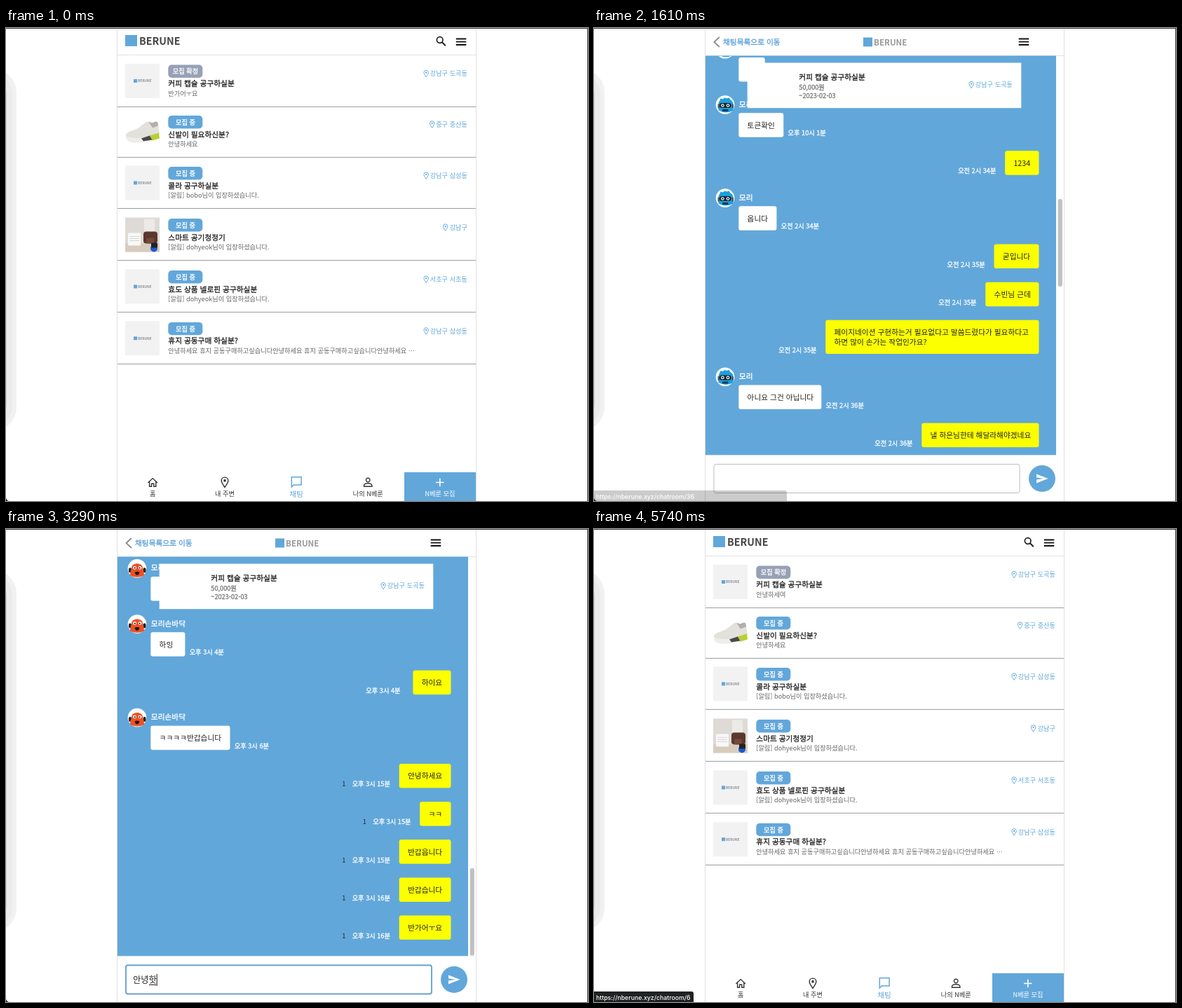
These frames come from a looping animation (830x675 px, 6020 ms). An HTML page:

```html
<!DOCTYPE html>
<html lang="ko">
<head>
<meta charset="utf-8">
<title>Chat room</title>
<style>
  html, body { margin: 0; width: 100%; height: 100%; overflow: hidden; background: #fff; }
  svg { display: block; width: 830px; height: 675px; }
  text { font-family: "Noto Sans CJK KR", "Noto Sans KR", "Noto Sans CJK", sans-serif; }
  /* medium weight: regular with a hairline outline */
  .m { stroke-width: .3px; }
  .b { font-weight: 700; }
  .end { text-anchor: end; }
  .mid { text-anchor: middle; }
  .tip text { font-family: Inter, "Noto Sans CJK KR", sans-serif; font-weight: 500; }
  .log { transform: translateY(calc(var(--s) * -1px)); }
  .bar1 { transform: translateY(calc(var(--s) * 569px / 2590)); }
  .bar2 { transform: translateY(calc(var(--s) * 569px / 2644)); }
</style>
</head>
<body>
<svg id="stage" viewBox="0 0 830 675"></svg>
<script>
const LOOP = 6020, STEP = 70;
const BLUE = '#62a7da', YELLOW = '#fbff00', BIG = 10.7, SMALL = 9.2;
let css = '', count = 0;

// Stepped keyframes from [ms, declarations] pairs
function anim(stops) {
  const id = 'k' + count++;
  const rows = stops.map(([ms, d]) => `${(Math.max(0, ms - 1) / LOOP * 100).toFixed(3)}%{${d}}`);
  css += `@keyframes ${id}{${rows.join('')}}`;
  return `style="animation:${id} ${LOOP}ms step-end infinite"`;
}
const fade = stops => anim(stops.map(([ms, o]) => [ms, `opacity:${o}`]));
const show = (from, to, body) => `<g ${fade([[0, 0], [from, 1], [to, 0]])}>${body}</g>`;

// y is the middle of the line
function txt(x, y, s, size, fill, cls = '') {
  const stroke = cls.split(' ').includes('m') ? `stroke="${fill}"` : '';
  return `<text x="${x}" y="${y + size * .38}" font-size="${size}" fill="${fill}" ${stroke} class="${cls}">${s}</text>`;
}
const box = (x, y, w, h, fill, r = 0) =>
  `<rect x="${x}" y="${y}" width="${w}" height="${h}" rx="${r}" fill="${fill}"/>`;
const line = (d, color, w = 1, fill = 'none') =>
  `<path d="${d}" fill="${fill}" stroke="${color}" stroke-width="${w}"/>`;
const dot = (x, y, r, fill) => `<circle cx="${x}" cy="${y}" r="${r}" fill="${fill}"/>`;

function em(c) {
  if (/[ㄱ-힣]/.test(c)) return .92;
  if (c === ' ') return .224;
  if (/\d/.test(c)) return .555;
  if (/[[\]]/.test(c)) return .338;
  return c === '.' ? .278 : .58;
}
const width = (s, size) => [...s].reduce((sum, c) => sum + em(c) * size, 0);

const pin = (x, y, k, color) => `<g transform="translate(${x} ${y}) scale(${k})">
  ${line('M0 5C-1.2 2.8-3.2.6-3.2-1.4A3.2 3.2 0 0 1 3.2-1.4C3.2.6 1.2 2.8 0 5Z', color, .95)}
  ${dot(0, -1.4, 1.2, color)}</g>`;
const place = (right, y, s) =>
  pin(right - width(s, SMALL) - 6, y, 1, BLUE) + txt(right, y, s, SMALL, BLUE, 'end');
const menu = x => line(`M${x} 15.5h14.5M${x} 19.7h14.5M${x} 24h14.5`, '#111', 1.8);

// ---- list page ----
const rooms = [
  ['커피 캡슐 공구하실분', '', '강남구 도곡동', 0],
  ['신발이 필요하신분?', '안녕하세요', '중구 중산동', 72.5],
  ['콜라 공구하실분', '[알림] bobo님이 입장하셨습니다.', '강남구 삼성동', 145.5],
  ['스마트 공기청정기', '[알림] dohyeok님이 입장하셨습니다.', '강남구', 219.5],
  ['효도 상품 넬로핀 공구하실분', '[알림] dohyeok님이 입장하셨습니다.', '서초구 서초동', 293.5],
  ['휴지 공동구매 하실분?',
    '안녕하세요 휴지 공동구매하고싶습니다안녕하세요 휴지 공동구매하고싶습니다안녕하세요 …', '강남구 삼성동', 367.3]
];

const blank = box(170, 51, 49, 49, '#f2f2f2') + box(182, 73, 5, 5, BLUE) +
  txt(188, 75.6, 'BERUNE', 4.8, '#8a8f96', 'b');
const shoe = `<path d="M171 80q1-4 9-6 9-3 14-8l7-5 7 2 6-2q3 0 3 5l2 13q-8 8-38 9-11 0-10-8z" fill="#e3e1dc"/>
  <path d="M171 82q10 4 24 2l23-5v7q-20 6-38 5-10-2-9-9z" fill="#eeedea"/>
  <path d="M203 61l5 2 6-2q3 0 3 6l-8 3z" fill="#b3b0ab"/>
  <path d="M193 85l12-4 4 6-13 2z" fill="#4a4a4a"/><path d="M205 81l13-4 1 8-10 3z" fill="#b9cf32"/>`;
const photo = box(170, 51, 49, 49, '#dedad6') + box(170, 88, 49, 12, '#d8ccbe') +
  box(197, 53, 15, 18, '#eceae7') + box(174, 73, 18, 18, '#f8f8f8', 1) +
  line('M176 78h14M176 81h14M176 84h14', '#cfcfcf', .8) + box(196, 71, 20, 17, '#5b382e', 4) +
  box(200, 80, 11, 8, '#75483a', 2) + dot(211, 95, 5, '#1c59cf') + box(207, 87, 9, 7, '#222', 1);

function room([title, last, where, dy], i) {
  const pic = i === 1 ? shoe : i === 3 ? photo : blank;
  return `<g transform="translate(0 ${dy})">${pic}
    ${box(231.3, 52.6, 49, 18.4, i ? BLUE : '#96a1b6', 5)}
    ${txt(256, 62, i ? '모집 중' : '모집 확정', SMALL, '#fff', 'm mid')}
    ${txt(231.3, 79, title, BIG, '#222', 'm')}${txt(231.3, 93.3, last, SMALL, '#666')}
    ${place(658, 65, where)}</g>` + line(`M158 ${Math.round(111.7 + dy)}.5h512`, '#98a0a4');
}

const tab = (x, s, color = '#333', size = SMALL) => txt(x, 664.5, s, size, color, 'mid');
const nav = box(568, 634, 102.5, 41, BLUE) +
  line('M202.5 649l6.7-6.4 6.7 6.4M204.6 647.5v6.7h3v-4h3.2v4h3v-6.7', '#333', 1.4) + tab(209.3, '홈') +
  pin(312, 648, 1.5, '#333') + tab(312, '내 주변') +
  line('M407.3 655v-14.3h13.8v11.3h-11z', BLUE, 1.5) + tab(414, '채팅', BLUE, BIG) +
  line('M510.5 654.2v-1.5c0-2 3.5-3 5.7-3s5.7 1 5.7 3v1.5zM519 645a2.8 2.8 0 1 0-5.6 0 2.8 2.8 0 1 0 5.6 0z', '#333', 1.4) +
  tab(516.3, '나의 N베룬') +
  line('M613 648.5h11.5M618.8 642.8v11.5', '#fff', 1.6) + tab(619, 'N베룬 모집', '#fff');

const list = box(170, 10, 17, 16, BLUE) + txt(190, 18.3, 'BERUNE', 14.3, '#444', 'b') +
  `<circle cx="618.7" cy="17" r="4.3" fill="none" stroke="#222" stroke-width="1.7"/>` +
  line('M621.8 20.2l5 5', '#222', 2) + menu(641.8) + line('M158 38.5h512', '#e3e3e3') +
  rooms.map(room).join('') +
  show(0, 1120, txt(231.3, 93.3, '반가어ㅜ요', SMALL, '#666')) +
  show(5390, LOOP, txt(231.3, 93.3, '안녕하세여', SMALL, '#666')) + nav;

// ---- chat page ----
const defs = `<defs>
  <clipPath id="view">${box(158, 40, 501, 569.5, '#000')}</clipPath>
  <g id="blue">${dot(0, 0, 13.3, '#fff')}
    <path d="M-9.5 8v-9q0-3 2-5l1-3 3 1 3-2 3 1 3-1 2 3q4 2 4 6v9q-10 6-21 0z" fill="#1c9fe0"/>
    ${box(-10.5, -1, 2.5, 6, '#555', 1)}${box(9.5, -1, 2.5, 6, '#555', 1)}${box(-8, -2.5, 16.5, 7, '#15242f', 3)}
    ${dot(-3.6, 1, 2.4, '#e8f4fa')}${dot(4, 1, 2.4, '#e8f4fa')}${dot(-3.6, 1, 1.1, '#111')}${dot(4, 1, 1.1, '#111')}
    ${box(-4, 6.5, 8.5, 3, '#14384c', 1)}</g>
  <g id="red">${dot(0, 0, 13.3, '#fff')}
    ${box(-12, -1, 4, 7, '#222', 2)}${box(8.5, -1, 4, 7, '#222', 2)}
    <path d="M-10 10q0-6 2-10 0-5 4-6 4-2 8 0 4 1 4 6 2 4 2 10-10 5-20 0z" fill="#ee5024"/>
    ${dot(-3.5, -1, 2.4, '#fff')}${dot(4, -1, 2.4, '#fff')}${dot(-3.2, -.8, 1.1, '#111')}${dot(3.7, -.8, 1.1, '#111')}
    <path d="M-3.5 5.5q3.500-2 7 0-1 4-3.500 4t-3.500-4z" fill="#1b1b1b"/></g></defs>`;

function received(y, s, time, who = 'blue') {
  const w = width(s, BIG) + 24.6;
  return `<use href="#${who}" x="187" y="${y + 13.3}"/>` +
    txt(206.8, y + 12.3, who === 'blue' ? '모리' : '모리손바닥', BIG, '#fff', 'm') +
    box(206.3, y + 25, w, 34.5, '#fff', 3) + txt(218.6, y + 42.3, s, BIG, '#222') +
    txt(206.3 + w + 6.3, y + 53.7, time, SMALL, '#fff', 'm');
}

function sent(y, s, time, unread) {
  const lines = s.split('\n'), extra = (lines.length - 1) * 13.6;
  const w = extra ? 304.3 : width(s, BIG) + 24.6, x = 634.5 - w;
  return box(x, y, w, 34.5 + extra, YELLOW, 3) +
    lines.map((l, i) => txt(x + 12.3, y + 17.3 + i * 13.6, l, BIG, '#222')).join('') +
    txt(x - 67, y + 28.8 + extra, time, SMALL, '#fff', 'm') +
    (unread ? txt(x - 81.5, y + 28.8, '1', SMALL, '#222') : '');
}

function notice(y, name) {
  const s = `[알림] ${name}님이 입장하셨습니다.`, w = width(s, BIG) + 30;
  return box(408.5 - w / 2, y, w, 24.6, '#89b4d9', 3) + txt(408.7, y + 12.4, s, BIG, '#fff', 'm mid');
}

const log = [
  notice(145, 'dohyeok'), sent(198, 'ㅁㄴㅇ', '오후 7시 1분'), notice(260, '모리'),
  ...[['뜨나요', '오후 7시 55분'], ['ㅎㅇ', '오후 7시 56분'], ['테스트하겟습니다', '오후 8시 13분'],
    ['테스트', '오후 8시 15분'], ['ㅎㅇ', '오후 8시 16분'], ['테스트', '오후 8시 20분'], ['확인', '오후 9시 2분'],
    ['테스트요', '오후 9시 58분'], ['네.', '오후 10시 1분'], ['토큰확인', '오후 10시 1분']
  ].map(([s, t], i) => received(312 + i * 79.25, s, t)),
  sent(1104.2, '1234', '오전 2시 34분'),
  received(1158.3, '옵니다', '오전 2시 34분'),
  sent(1237.6, '굳입니다', '오전 2시 35분'),
  sent(1291.7, '수빈님 근데', '오전 2시 35분'),
  sent(1345.8, '페이지네이션 구현하는거 필요없다고 말씀드렸다가 필요하다고\n하면 많이 손가는 작업인가요?', '오전 2시 35분'),
  received(1413.6, '아니요 그건 아닙니다', '오전 2시 36분'),
  sent(1492.8, '낼 하은님한테 해달라해야겠네요', '오전 2시 36분'),
  received(1547, '네네', '오전 2시 37분'),
  sent(1626, '감사합니다', '오전 2시 37분'), sent(1680.5, 'ㅋㅋ', '오전 2시 38분'),
  received(1735, '좋아요', '오전 2시 38분'), sent(1814, '넵', '오전 2시 39분'),
  notice(1875, '모리손바닥'),
  received(1927, '안녕하세요', '오후 3시 3분', 'red'), sent(2007, '안녕하세요', '오후 3시 3분'),
  received(2064, '하이요', '오후 3시 4분', 'red'), received(2143.3, '하잉  ', '오후 3시 4분', 'red'),
  sent(2222.8, '하이요', '오후 3시 4분'), received(2276.8, 'ㅋㅋㅋㅋ반갑습니다', '오후 3시 6분', 'red'),
  ...[['안녕하세요', 15], ['ㅋㅋ', 15], ['반갑읍니다', 15], ['반갑습니다', 16], ['반가어ㅜ요', 16]]
    .map(([s, min], i) => sent(2356.1 + i * 54.1, s, `오후 3시 ${min}분`, true)),
  show(4130, 5390, sent(2626.6, '안녕하세여', '오후 3시 16분', true))
].join('');

// Scroll offset: eased run to the bottom, then a short one after sending
const ease = p => (1 - Math.cos(Math.PI * Math.min(1, Math.max(0, p)))) / 2;
const scroll = [[0, '--s:0']];
for (let t = 1260; t <= 4410; t += STEP) {
  const s = 2021 * ease((t - 1250) / 759) + 54 * ease((t - 4180) / 270);
  if (t <= 2030 || t >= 4130) scroll.push([t, `--s:${t === 4410 ? 2075 : Math.round(s)}`]);
}

const card = box(218.7, 49.6, 390.6, 64.6, '#fff') + txt(292.3, 70, '커피 캡슐 공구하실분', BIG, '#222', 'm') +
  txt(292.3, 84.4, '50,000원', SMALL, '#777', 'm') + txt(292.3, 96.6, '~2023-02-03', SMALL, '#777', 'm') +
  place(597, 81, '강남구 도곡동');

const bar = (n, h) => `<g class="bar${n}">${box(661.7, 40, 6.2, h, '#c1c1c1', 3)}</g>`;

// Composing states of the input line
const typed = [[2030, ''], [2450, 'ㅇ'], [2520, '아'], [2590, '안'], [2730, '안ㄴ'], [2800, '안녀'], [2870, '안녕'],
  [3150, '안녕ㅎ'], [3220, '안녕하'], [3290, '안녕핫'], [3360, '안녕하세'], [3500, '안녕하셍'], [3570, '안녕하세여'],
  [4130, ''], [4620, null]];
const typing = typed.slice(0, -1).map(([t, s], i) => {
  const adv = 11.22, x = 181, end = x + s.length * adv;
  const under = s ? line(`M${end - adv + .5} 650.5h${adv - 1}`, '#222') : '';
  return show(t, typed[i + 1][0], txt(x, 643.5, s, 12.2, '#222') + under + box(end, 635, 1, 17, '#111'));
}).join('');

const field = (color, w) =>
  `<rect x="171" y="622.5" width="436" height="41" rx="3" fill="#fff" stroke="${color}" stroke-width="${w}"/>`;

const chat = `<g ${anim(scroll)}>` + box(158, 1, 512, 674, '#fff') +
  show(5180, 5390, box(159, 11, 19, 17.5, '#e0effb', 6)) +
  line('M178.8 13l-7.3 7 7.3 7', '#8b8b8b', 1.8) +
  txt(184, 20.3, '채팅목록으로 이동', BIG, '#5a9fd6', 'm') +
  box(384, 13.5, 13, 13, BLUE) + txt(399, 20.3, 'BERUNE', 11.6, '#999', 'b') + menu(605.7) +
  line('M158 39.5h512', '#dde3e8') + box(158, 39.6, 501, 569.8, BLUE) +
  show(1190, 5390, `<g clip-path="url(#view)"><g class="log">${log}</g></g>` + card) +
  show(1190, 4130, bar(1, 125)) + show(4130, 5390, bar(2, 122)) +
  field('#bcbcbc', 1) + show(2030, 5180, field('#62a1cf', 1.8)) + typing +
  dot(639, 643, 19, BLUE) + '<path d="M631 636.5l16.5 6.5-16.5 6.5v-5l10-1.5-10-1.5z" fill="#fff"/></g>';

// ---- browser status line ----
const tip = (stops, w, s) => `<g class="tip" ${fade([[0, 0], ...stops])}>
  <path d="M0 675v-15h${w - 3}q3 0 3 3v12z" fill="#202122"/>${txt(3, 668.2, s, 8.75, '#fff')}</g>`;
const link = 'https://nberune.xyz/chatroom/';
const tips = tip([[770, .5], [840, 1], [1120, 0]], 149, link + 36) +
  tip([[1120, 1], [1540, .6], [1610, .23], [1680, 0]], 275, link + 36) +
  tip([[5250, .5], [5320, 1], [5670, 0]], 275, 'nberune.site의 응답을 기다리는 중...') +
  tip([[5670, 1], [5740, 0]], 275, link + 6) + tip([[5740, 1]], 142, link + 6);

const phone = box(-60, 58, 75, 517, '#f1f1f1', 34) + box(-60, 64, 69, 505, '#ebebeb', 30) +
  box(-60, 76, 61, 480, '#d6d6d6', 20);
const frame = line('M158.5 1v674M670.5 1v674', '#e0e0e0') +
  line('M0 .5h830M829.5 0v675', '#3a3a3a') + '<path d="M0 671q1 3 4 4H0z" fill="#222"/>';

document.getElementById('stage').innerHTML =
  defs + phone + list + show(1120, 5390, chat) + frame + tips;
document.head.appendChild(document.createElement('style')).textContent = css;
</script>
</body>
</html>
```
